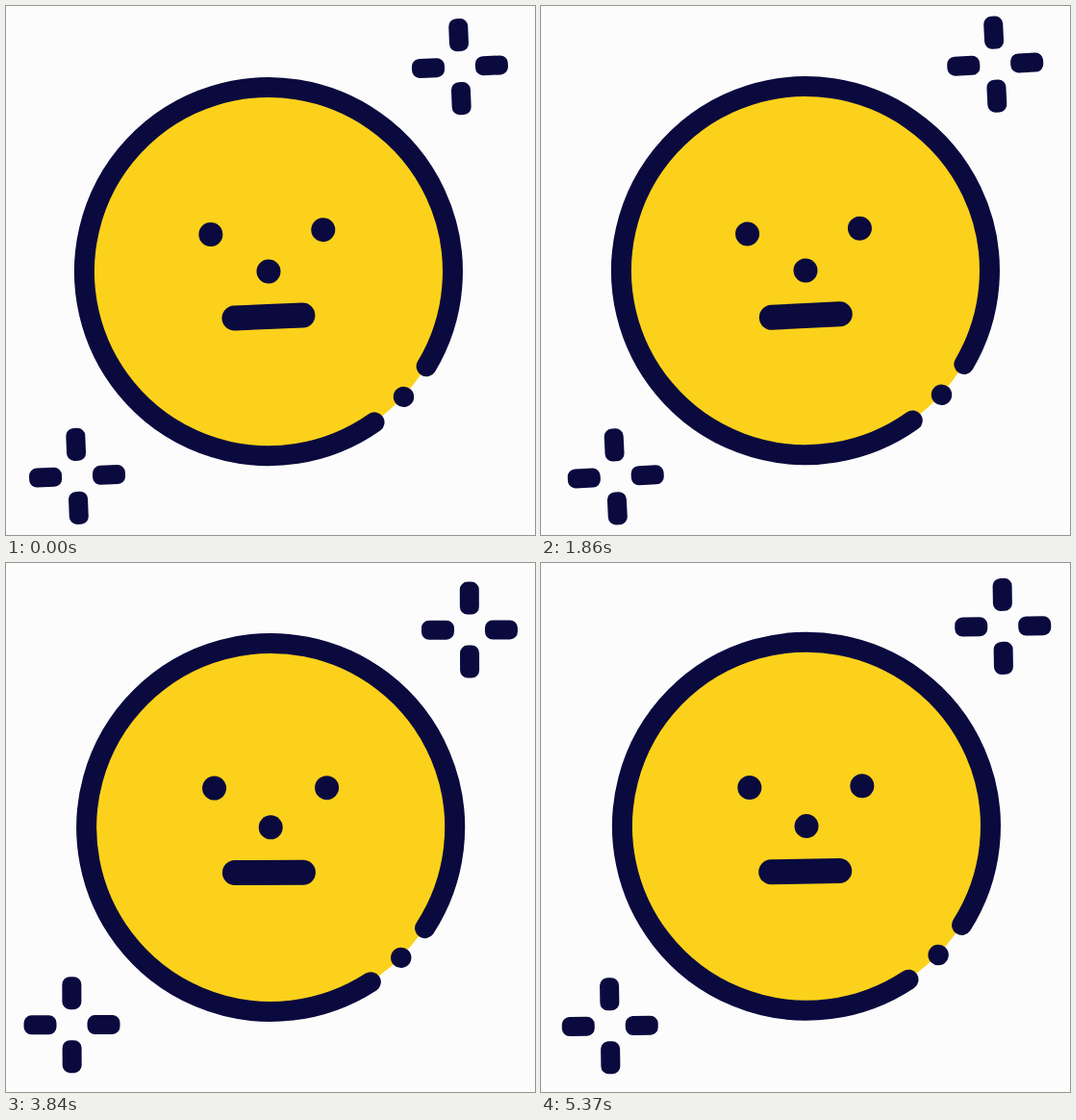
Write an HTML page that moves like this. It is 550 px wide and 550 px high and loops after 5400 ms.

```html
<!DOCTYPE html>
<html lang="en">
<head>
<meta charset="utf-8">
<title>Wobbling face</title>
<style>
  html, body { margin: 0; width: 100%; height: 100%; overflow: hidden; background: #fcfcfc; }
  svg { display: block; width: 100%; height: 100%; }
</style>
</head>
<body>
<svg viewBox="0 0 550 550">
  <defs>
    <rect id="ray" x="16" y="-10" width="34" height="20" rx="8"/>
    <g id="spark">
      <use href="#ray"/>
      <use href="#ray" transform="rotate(90)"/>
      <use href="#ray" transform="rotate(180)"/>
      <use href="#ray" transform="rotate(270)"/>
    </g>
  </defs>
  <g id="face" fill="#0a0a3f" stroke-linecap="round">
    <circle r="191" fill="#fbd11b"/>
    <path d="M103.5 161.2A191.5 191.5 0 1 1 159.9 105.4" fill="none" stroke="#0a0a3f" stroke-width="21"/>
    <circle cx="135" cy="136" r="10.7"/>
    <circle cx="-58.5" cy="-41" r="12.5"/>
    <circle cx="58.5" cy="-41" r="12.5"/>
    <circle r="12.5"/>
    <path d="M-37.5 47H33.5" stroke="#0a0a3f" stroke-width="26"/>
    <use href="#spark" x="207.5" y="-204.5"/>
    <use href="#spark" x="-207.5" y="204.5"/>
  </g>
</svg>
<script>
const LOOP = 5400, STEP = 30;

// Wobble poses: time, x, y, angle
const poses = [
  [0, 273, 276, -2.35], [170, 276, 275.5, -2.7], [350, 273.5, 275, -3.25],
  [570, 269.8, 276, -1.65], [830, 274, 274, 0.6], [1070, 277.5, 272.5, 2.3],
  [1170, 278, 272.6, 1.75], [1310, 271.8, 273, 1.6], [1710, 274, 275, -2.2],
  [1860, 275, 275, -2.8], [2060, 276, 277, -3.85], [2280, 278, 277, -2.5],
  [2730, 278.7, 276.7, 0.35], [2850, 276.2, 275, 0.85], [3060, 275, 266.5, 2],
  [3250, 273.5, 269.5, 3.2], [3390, 273.5, 272.1, 2.65], [3510, 276.5, 273, 2.55],
  [3720, 275, 274, 0.8], [3990, 276, 275.5, -1.5], [4120, 277, 273.5, -2.6],
  [4260, 279.2, 270.5, -1.6], [4560, 277.5, 270.5, 1.8], [4770, 278, 272, 3.85],
  [5130, 272.5, 274.5, 0.9], [5370, 276, 273.6, -0.9]
];
const last = poses.length - 1;
const face = document.getElementById('face');

function slope(i, k) {
  const a = poses[Math.max(i - 1, 0)], b = poses[Math.min(i + 1, last)];
  return (b[k] - a[k]) / (b[0] - a[0]);
}

// Cubic Hermite curve through the poses
function valueAt(t, k) {
  let i = 0;
  while (i < last - 1 && t >= poses[i + 1][0]) i++;
  const a = poses[i], b = poses[i + 1], d = b[0] - a[0];
  const s = (t - a[0]) / d, r = 1 - s;
  return r * r * ((1 + 2 * s) * a[k] + s * d * slope(i, k))
       + s * s * ((1 + 2 * r) * b[k] - r * d * slope(i + 1, k));
}

function draw(now) {
  const t = Math.floor(now % LOOP / STEP) * STEP;
  const [x, y, angle] = [1, 2, 3].map(k => valueAt(t, k));
  face.setAttribute('transform', `translate(${x} ${y}) rotate(${angle})`);
}

let start;
function tick(now) {
  start ??= now;
  draw(now - start);
  requestAnimationFrame(tick);
}
draw(0);
requestAnimationFrame(tick);
</script>
</body>
</html>
```
